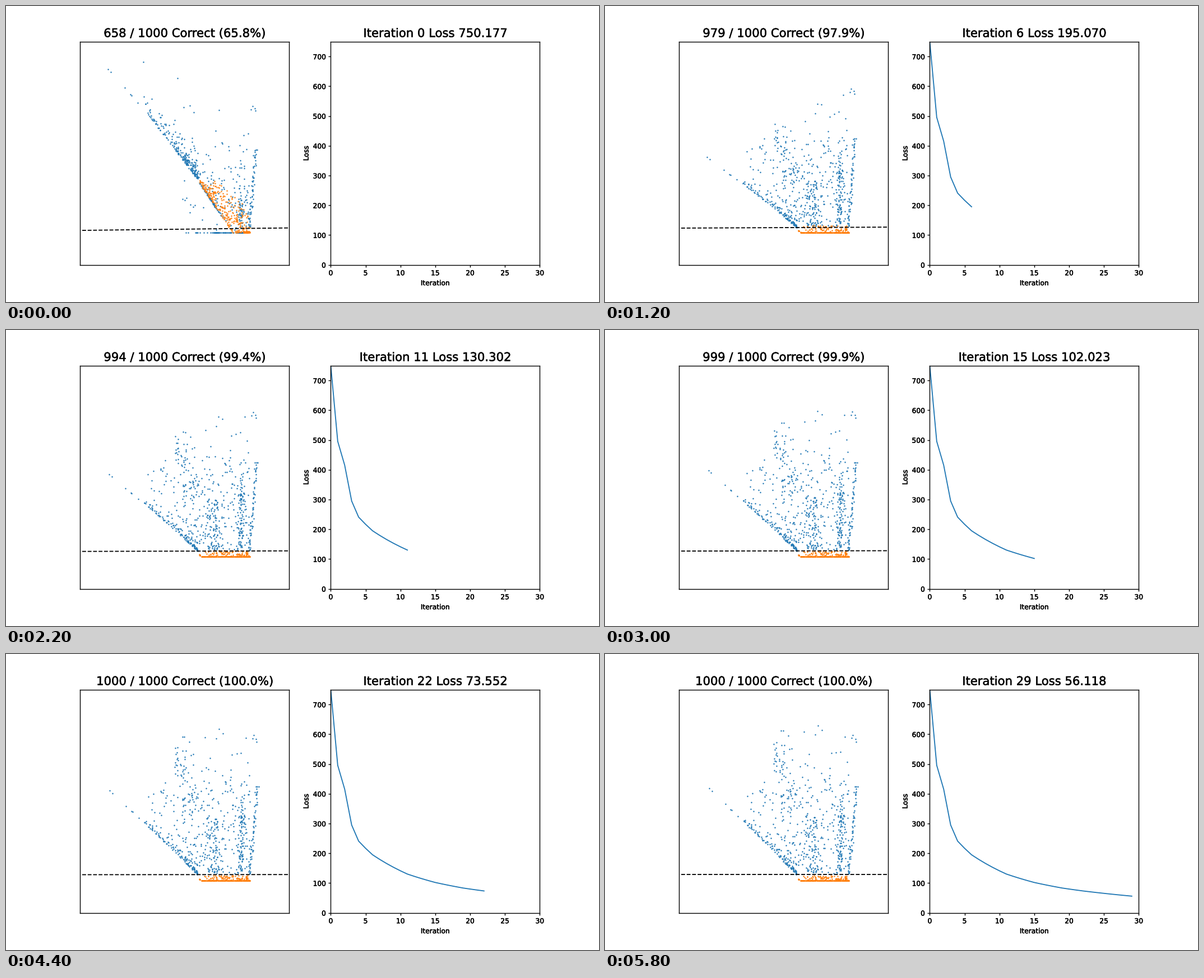
A matplotlib script for the animation above (6000 ms loop, 1058 px wide and 529 px high).

```python
import numpy as np
import matplotlib.pyplot as plt
from matplotlib.animation import FuncAnimation
from matplotlib.patheffects import withStroke

W, H, DPI = 1058, 529, 1058 / 12
LEFT, TOP, BOTTOM, PANEL_W = 132.25, 63.5, 462.6, 372.9
RIGHT_X = 579.4
BASE = 405.3          # height at which the rectified feature is zero
MID, LAST = 6, 29     # ends of the fast and the slow phase
BLUE, ORANGE = "#1f77b4", "#ff7f0e"

rng = np.random.default_rng(11)


def loss(n):
    """Decay that is exponential between a few key points."""
    at = [0, 1, 2, 3, 4, 6, 11, 15, 19, 22, 29]
    value = [750.177, 495.6, 415.4, 295.1, 241, 195.07, 130.302, 102.023,
             83.363, 73.552, 56.118]
    return np.exp(np.interp(n, at, np.log(value)))


def correct(n):
    return round(np.interp(n, [0, 3, 6, 11, 15, 19],
                           [658, 893, 979, 994, 999, 1000]))


# Left border of the cloud: at the start, after the fast phase, at the end
def edge_start(x):
    return np.interp(x, [183, 250, 340, 404], [113, 190, 308, BASE])


def edge_mid(x):
    return np.interp(x, [182, 300, 352], [270, 360, BASE])


def edge_end(x):
    return np.interp(x, [182, 300, 352], [240, 351, BASE])


def drift(x, y):
    full = np.interp(x, [182, 290, 335, 370, 400], [4, 0, -5, -1, 3])
    return full * np.clip((BASE - y) / 130, 0, 1)


def fall(n, reach, power):
    """Heights up to reach, crowded near zero."""
    return reach * rng.random(n) ** power


def blue_mid():
    """Cloud of the outer class after the fast phase."""
    tail = np.array([182, 187, 212, 222, 223.5, 235])
    rim = 342 - fall(110, 96, 1.5)
    streak = rng.uniform(300, 357, 40)
    upper = rng.uniform(250, 340, 50)
    fill = rng.uniform(316, 436, 235)
    high = rng.uniform(280, 447, 32)
    h = fall(60, 160, 1.2)
    ceiling = np.interp(high, [280, 340, 365, 445], [205, 240, 175, 138])
    parts = [
        (tail, edge_mid(tail)),
        (rim, edge_mid(rim) - rng.exponential(6, 110)),
        (streak, 237 + (streak - 305) * 1.8 + rng.normal(0, 9, 40)),
        (upper, edge_mid(upper) - rng.uniform(0, 105, 50)),
        (fill, np.minimum(393, edge_mid(fill)) - fall(235, 165, 1.4)),
        (high, ceiling + rng.exponential(38, 32)),
        (rng.normal(373, 5, 55), 393 - fall(55, 85, 1)),
        (rng.normal(418, 3.2, 80), 393 - fall(80, 135, 1.2)),
        (434 + h * 0.072 + rng.normal(0, 1.4, 60), 393 - h),
    ]
    return np.concatenate(parts, axis=1)


def blue_start(x, y):
    n = len(x)
    pick = rng.random(n)
    on_edge = x < 240
    near = edge_start(x) - rng.exponential(np.where(pick < 0.8, 9, 34))
    spread = BASE - (BASE - y) * rng.uniform(0.35, 1.05, n)
    y0 = np.where(x < 345, near, np.minimum(spread, edge_start(x)))
    y0 = np.where(x > 433, BASE - (BASE - y) * 0.88, y0)
    flat = (x > 371) & (x < 424) & (pick < 0.36)
    flat |= (x > 317) & (x < 356) & (pick < 0.06)
    y0[flat] = BASE
    below = (x > 283) & (x < 400) & (pick > 0.95)
    y0[below] = edge_start(x[below]) + rng.uniform(20, 80, below.sum())
    return np.where(on_edge, edge_start(x), np.minimum(y0, BASE))


def blue_end(x, y):
    gain = np.interp(x, [246, 292, 310, 340, 370, 400, 445],
                     [0.8, 1, 1.45, 1.45, 1.25, 1.1, 1])
    return edge_end(x) - gain * (edge_mid(x) - y)


def orange_points(n):
    x = np.concatenate([rng.uniform(343, 353, 20),
                        rng.uniform(353, 424, n - 90),
                        rng.uniform(424, 435, 70)])
    lifted = (rng.random(n) < 0.32) & (x > 353)
    rise = np.where(lifted, fall(n, 13, 1.2), 0)
    y1 = np.minimum(BASE, edge_mid(x) + 2) - rise
    y2 = BASE - (BASE - y1) * 0.7
    top = np.interp(x, [342, 380, 436], [311, 313, 366])
    foot = edge_start(x)
    y0 = foot - rng.beta(0.8, 1.5, n) * np.maximum(foot - top, 4)
    flat = (x > 424) & (rng.random(n) < 0.72)
    y0[flat] = BASE - rng.uniform(0, 2.5, flat.sum())
    return x, y0, y1, y2


def stages(x, y0, y1, y2):
    """Key poses as an array of shape (3, 2, n)."""
    x0 = x + rng.normal(0, 0.6, len(x))
    return np.array([(x0, y0), (x, y1), (x + drift(x, y2), y2)])


bx, by = blue_mid()
blue = stages(bx, blue_start(bx, by), by, blue_end(bx, by))
orange = stages(*orange_points(1000 - len(bx)))
border = np.array([(401, 396.6), (396.9, 395.2), (394, 394)])


def pose(keys, n):
    """Blend the key poses along with the falling loss."""
    if n <= MID:
        t = (loss(0) - loss(n)) / (loss(0) - loss(MID))
        return keys[0] + (keys[1] - keys[0]) * t
    t = ((loss(MID) - loss(n)) / (loss(MID) - loss(LAST))) ** 1.15
    return keys[1] + (keys[2] - keys[1]) * t


def panel(x):
    return fig.add_axes([x / W, 1 - BOTTOM / H, PANEL_W / W,
                         (BOTTOM - TOP) / H])


plt.rcParams.update({
    "font.family": "DejaVu Sans", "axes.linewidth": 1.15,
    "xtick.major.width": 1.15, "ytick.major.width": 1.15,
    "axes.titlesize": "xx-large", "axes.titlepad": 6.6})
fig = plt.figure(figsize=(12, 6), dpi=DPI, facecolor="white")
ax = panel(LEFT)
ax.set(xlim=(LEFT, LEFT + PANEL_W), ylim=(BOTTOM, TOP), xticks=[], yticks=[])
dot = dict(marker="o", ms=1, ls="none")
blue_dots, = ax.plot([], [], color=BLUE, **dot)
orange_dots, = ax.plot([], [], color=ORANGE, **dot)
split, = ax.plot([], [], "--", color="black", lw=1.5)

ax2 = panel(RIGHT_X)
ax2.set(xlim=(0, 30), ylim=(0, loss(0)), xlabel="Iteration", ylabel="Loss")
curve, = ax2.plot([], [], color=BLUE, lw=1.5)

# Slightly heavier lettering
for text in [ax.title, ax2.title, ax2.xaxis.label, ax2.yaxis.label,
             *ax2.get_xticklabels(), *ax2.get_yticklabels()]:
    text.set_path_effects([withStroke(linewidth=0.4, foreground="black")])


def update(n):
    blue_dots.set_data(*pose(blue, n))
    orange_dots.set_data(*pose(orange, n))
    split.set_data([136, 505], pose(border, n))
    steps = np.arange(n + 1)
    curve.set_data(steps, loss(steps))
    good = correct(n)
    ax.set_title(f"{good} / 1000 Correct ({good / 10:.1f}%)")
    ax2.set_title(f"Iteration {n} Loss {loss(n):.3f}")
    return blue_dots, orange_dots, split, curve


anim = FuncAnimation(fig, update, frames=30, interval=200, repeat=True,
                     repeat_delay=0, init_func=lambda: update(0))
plt.show()
```
